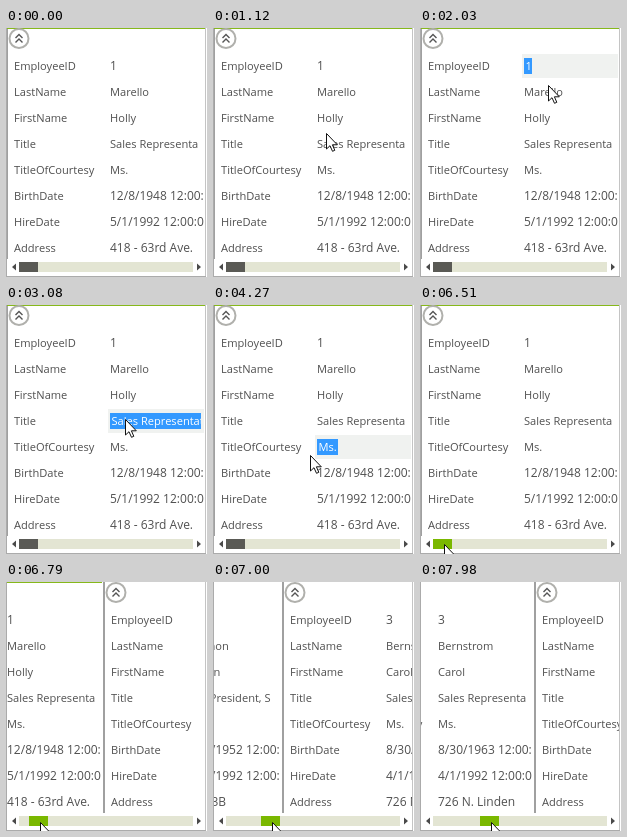
An HTML page for the animation above (8 s loop, 201x249 px).

```html
<!DOCTYPE html>
<html lang="en">
<head>
<meta charset="utf-8">
<title>Card view</title>
<style>
  html, body { margin: 0; width: 100%; height: 100%; overflow: hidden; background: #fff; }
  svg { display: block; }
  text { font: 11.1px "Open Sans", "Noto Sans", sans-serif; fill: #505050; white-space: pre; }
  .digits { font-size: 12px; }
  .selected { fill: #fff; }
  rect { shape-rendering: crispEdges; }
</style>
</head>
<body>
<svg id="stage" width="100%" height="100%" viewBox="0 0 201 249">
  <rect width="201" height="249" fill="#fff"/>
  <svg width="199" height="231" overflow="hidden">
    <g id="cards"></g>
    <g id="editor">
      <rect x="102" y="-12" width="96" height="24" fill="#f0f2f0"/>
      <rect id="selection" x="104" y="-8" height="16" fill="#3399ff"/>
      <svg x="104" y="-12" width="91" height="24" overflow="hidden">
        <text id="editText" class="selected" x="1.5" y="16"></text>
      </svg>
      <rect id="caret" x="124" y="-8" width="1" height="15" fill="#e08a2c"/>
    </g>
  </svg>
  <g id="scrollbar">
    <rect x="13" y="234" width="174" height="10" fill="#e3e5d3"/>
    <rect id="thumb" y="234" width="19" height="10"/>
    <path d="M10 235.5V242.5L6 239ZM191 235.5V242.5L195 239Z" fill="#4a4a4a"/>
  </g>
  <rect width="1" height="249" fill="#ababab"/>
  <rect x="199" width="1" height="249" fill="#c4c4c4"/>
  <rect y="248" width="200" height="1" fill="#ababab"/>
  <path id="pointer" d="M.5 .5V16L4 12.7L6.5 18.3L8.8 17.3L6.4 11.8H11.3Z" fill="#fff" stroke="#111" stroke-linejoin="round"/>
</svg>
<script>
const STEP = 70, LOOP = 8000, CARD = 200, ROW = 26, FIRST_ROW = 38;
const el = id => document.getElementById(id);
const rowY = row => FIRST_ROW + row * ROW;

const fields = ["EmployeeID", "LastName", "FirstName", "Title", "TitleOfCourtesy", "BirthDate", "HireDate", "Address"];
const records = [
  ["1", "Marello", "Holly", "Sales Representa", "Ms.", "12/8/1948 12:00:", "5/1/1992 12:00:0", "418 - 63rd Ave."],
  ["2", "Harmon", "Martin", "Vice President, S", "Dr.", "2/19/1952 12:00:", "8/14/1992 12:00:", "Apt. 3B"],
  ["3", "Bernstrom", "Carol", "Sales Representa", "Ms.", "8/30/1963 12:00:", "4/1/1992 12:00:0", "726 N. Linden"],
  []
];

const label = (x, y, s) =>
  `<text x="${x}" y="${y + 4}"${/\d/.test(s) ? ' class="digits"' : ""}>${s}</text>`;

function card(values, index) {
  const rows = fields.map((name, row) =>
    label(8, rowY(row), name) +
    (values[row] ? `<g id="v${index}-${row}">${label(104, rowY(row), values[row])}</g>` : "")).join("");
  const top = index === 0 ? '<rect width="199" height="1" fill="#86b81b"/>' : "";
  return `<g transform="translate(${index * CARD})">
    <rect width="2" height="231" fill="#a0a0a0"/>${top}${rows}
    <circle cx="13" cy="10.5" r="9.5" fill="#fff" stroke="#b0b0ac" stroke-width="2"/>
    <path d="M9.5 10L13 6.5L16.5 10M9.5 14.5L13 11L16.5 14.5" fill="none" stroke="#555" stroke-width="1.4"/>
  </g>`;
}
el("cards").innerHTML = records.map(card).join("");

// Keys are [step, value...], with one step lasting 70 ms.
const pointerKeys = [
  [12, 97, 176], [20, 128, 33], [24, 128, 33], [29, 128, 57], [31, 127, 61], [33, 127, 61],
  [42, 120, 114], [45, 118, 114], [52, 123, 138], [57, 123, 138], [61, 97, 150], [65, 72, 151],
  [71, 72, 151], [80, 32, 234], [82, 24, 239], [94, 24, 239], [97, 34, 240], [100, 59, 240],
  [103, 70, 240], [113, 70, 240], [114, 71, 240]
];
const scrollKeys = [[94, 0], [97, 103], [100, 331], [103, 476], [113, 476], [114, 486]];

const edits = [
  { from: 21, to: 43, row: 0, text: "1", width: 8 },
  { from: 43, to: 49, row: 3, text: "Sales Representative", width: 91 },
  { from: 49, to: 92, row: 4, text: "Ms.", width: 21 }
];
const caretOn = [[49, 56], [64, 72], [79, 86]];
const within = (step, from, to) => step >= from && step < to;

function sample(keys, step) {
  const next = keys.findIndex(key => key[0] > step);
  if (next === 0) return keys[0].slice(1);
  if (next < 0) return keys[keys.length - 1].slice(1);
  const a = keys[next - 1], b = keys[next];
  const p = (step - a[0]) / (b[0] - a[0]);
  return a.slice(1).map((v, i) => Math.round(v + (b[i + 1] - v) * p));
}

const show = (node, on) => node.setAttribute("visibility", on ? "visible" : "hidden");

function render(ms) {
  const step = Math.floor(ms / STEP);
  const [x, y] = sample(pointerKeys, step);
  const [scroll] = sample(scrollKeys, step);

  el("cards").setAttribute("transform", `translate(${-scroll})`);
  el("pointer").setAttribute("transform", `translate(${x} ${y})`);
  show(el("pointer"), step >= 12);

  const pressed = step >= 92;
  el("thumb").setAttribute("x", pressed ? x - 11 : 13);
  el("thumb").setAttribute("fill", pressed ? "#7ab800" : "#5a5a55");

  const edit = edits.find(e => within(step, e.from, e.to));
  show(el("editor"), edit);
  edits.forEach(e => show(el("v0-" + e.row), e !== edit));
  if (edit) {
    el("editor").setAttribute("transform", `translate(0 ${rowY(edit.row)})`);
    el("selection").setAttribute("width", edit.width);
    el("editText").textContent = edit.text;
  }
  show(el("caret"), caretOn.some(([from, to]) => within(step, from, to)));
}

const start = performance.now();
function tick() {
  render((performance.now() - start) % LOOP);
  requestAnimationFrame(tick);
}
render(0);
requestAnimationFrame(tick);
</script>
</body>
</html>
```
